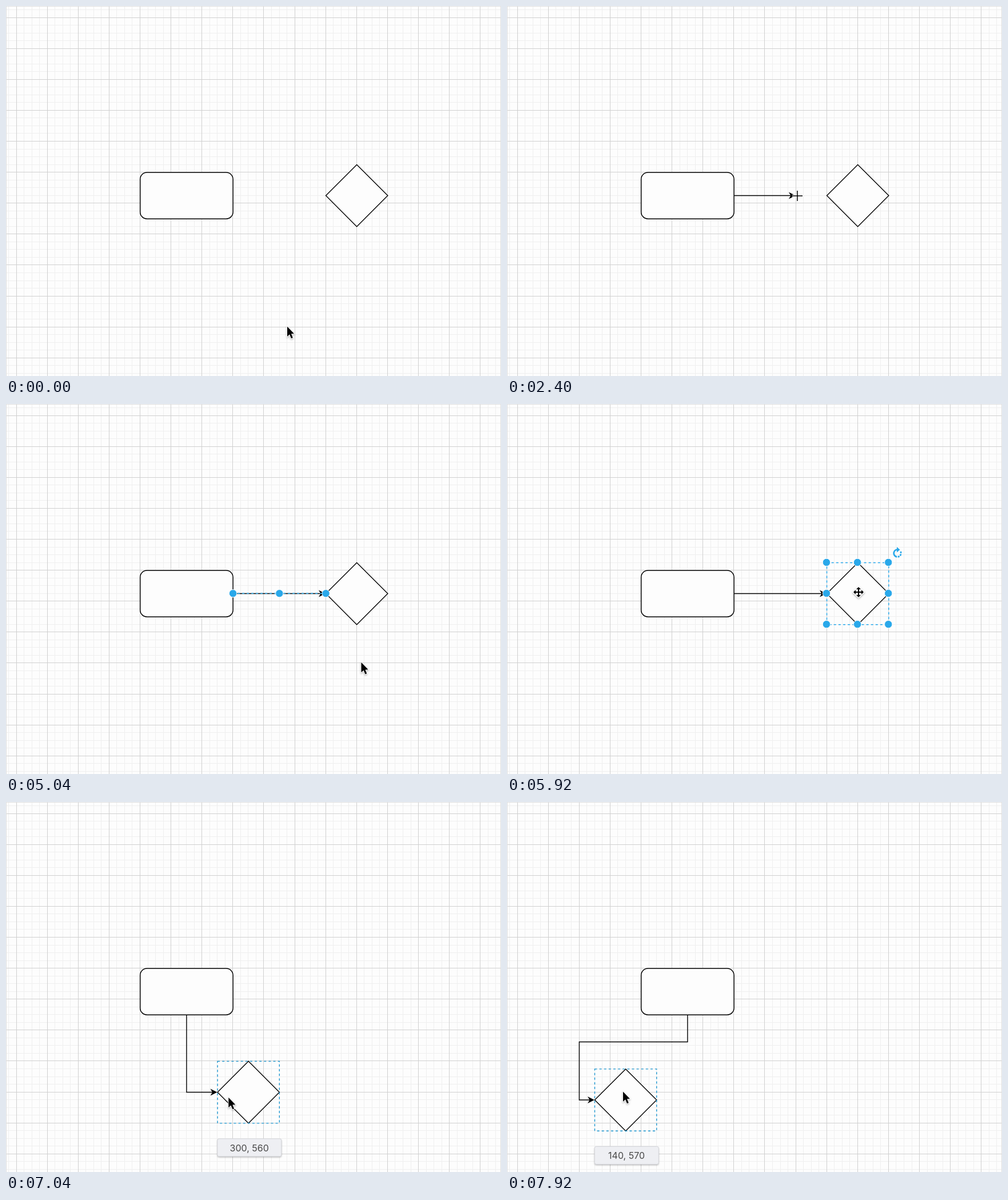
An HTML page with a canvas that plays this animation: 866 by 647 pixels, repeating every 8000 ms.

```html
<!DOCTYPE html>
<html>
<head>
<meta charset="utf-8">
<style>
  html, body { margin: 0; width: 866px; height: 647px; overflow: hidden; background: #fdfdfd; }
  canvas { display: block; }
</style>
</head>
<body>
<canvas id="stage" width="866" height="647"></canvas>
<script>
const W = 866, H = 647, LOOP = 8000, STEP = 80, LAG = 60;
const UNIT = 1.3535, OX = -36, OY = -304.6;
const BLUE = '#29a8ea', GREEN = '#86fc7c', PAPER = '#fdfdfd';
const ctx = document.getElementById('stage').getContext('2d');

// Diagram units
const BOX = { x: 200, y: 440, w: 120, h: 60 };
const HOME = { x: 440, y: 430 }, SIZE = 80, ROW = 470;

// When each part of the gesture begins
const AIM = 1440, CONNECT = 1680, DOCK = 3120, RELEASE = 3920, LEAVE = 4560,
      DESELECT = 5120, SELECT = 5840, DRAG = 6160;

// Pointer stops: time, x, y
const stops = [
  [0, 492, 560], [80, 422, 464], [240, 422, 464], [880, 318, 332], [1520, 397, 332],
  [2160, 462, 332], [2400, 508, 332], [2960, 574, 332], [3440, 555, 332], [4480, 555, 332],
  [4960, 650, 450], [5440, 479, 458], [5840, 615, 329], [6080, 615, 329], [6240, 627, 390],
  [6640, 586, 447], [7120, 350, 530], [7440, 292, 534], [7760, 222, 531], [7920, 203, 506]
];

const px = x => OX + x * UNIT;
const py = y => OY + y * UNIT;
const snap = v => Math.round(v / 10) * 10;

function pointerAt(t) {
  const i = stops.findIndex(s => s[0] > t);
  if (i < 0) return stops[stops.length - 1].slice(1);
  const [t0, x0, y0] = stops[i - 1], [t1, x1, y1] = stops[i];
  const k = (t - t0) / (t1 - t0);
  return [x0 + (x1 - x0) * k, y0 + (y1 - y0) * k];
}

// The dragged shape trails the pointer and snaps to the grid.
function diamondAt(t) {
  if (t < DRAG) return HOME;
  const [x, y] = pointerAt(t - LAG);
  return { x: snap((x - OX) / UNIT - SIZE / 2), y: snap((y - OY) / UNIT - SIZE / 2) };
}

function trace(points, closed) {
  ctx.beginPath();
  points.forEach(([x, y]) => ctx.lineTo(x, y));
  if (closed) ctx.closePath();
}

function circle(x, y, r) {
  ctx.beginPath();
  ctx.arc(x, y, r, 0, 7);
}

function stroke(color, width, dash = []) {
  ctx.strokeStyle = color;
  ctx.lineWidth = width;
  ctx.setLineDash(dash);
  ctx.stroke();
  ctx.setLineDash([]);
}

function fill(color) {
  ctx.fillStyle = color;
  ctx.fill();
}

function scoped(props, draw) {
  ctx.save();
  Object.assign(ctx, props);
  draw();
  ctx.restore();
}

const withShadow = draw => scoped({ shadowColor: 'rgba(0,0,0,.3)', shadowBlur: 3, shadowOffsetY: 1.5 }, draw);
const tint = draw => scoped({ globalCompositeOperation: 'multiply' }, draw);

function drawGrid() {
  ctx.fillStyle = PAPER;
  ctx.fillRect(0, 0, W, H);
  for (const major of [false, true]) {
    ctx.fillStyle = major ? '#d0d0d0' : '#efefef';
    for (let i = -1; i < 64; i++) {
      if ((i % 4 === 0) !== major) continue;
      ctx.fillRect(Math.floor(18 + i * 13.53), 0, 1, H);
      ctx.fillRect(0, Math.floor(20 + i * 13.53), W, 1);
    }
  }
  ctx.strokeStyle = '#e0e0e0';
  ctx.lineWidth = 1;
  ctx.strokeRect(.5, .5, W - 1, H + 9);
}

function drawBox() {
  ctx.beginPath();
  ctx.roundRect(px(BOX.x), py(BOX.y), BOX.w * UNIT, BOX.h * UNIT, 12);
  fill(PAPER);
  stroke('#000', 1.5);
}

function corners({ x, y }) {
  const h = SIZE / 2;
  return [[h, 0], [SIZE, h], [h, SIZE], [0, h]].map(([a, b]) => [px(x + a), py(y + b)]);
}

function drawDiamond(pos) {
  trace(corners(pos), true);
  fill(PAPER);
  stroke('#000', 1.4);
}

function drawEdge(points) {
  const p = points.map(([x, y]) => [px(x), py(y)]);
  const [x, y] = p.pop();
  const headed = x - p[p.length - 1][0] > 13;
  trace([...p, [headed ? x - 8 : x, y]]);
  stroke('#000', 1.4);
  if (!headed) return;
  trace([[x - .5, y], [x - 12.5, y - 6], [x - 9, y], [x - 12.5, y + 6]], true);
  fill('#000');
}

// Right-angled path from the box to the diamond's left corner
function route({ x, y }) {
  const right = BOX.x + BOX.w, bottom = BOX.y + BOX.h, center = BOX.x + BOX.w / 2;
  const endY = y + SIZE / 2, end = [x, endY];
  if (x >= right + 40) {
    const mid = (right + x) / 2;
    return [[right, ROW], [mid, ROW], [mid, endY], end];
  }
  if (x > center) return [[center, bottom], [center, endY], end];
  const mid = (bottom + y) / 2, left = Math.min(BOX.x, x) - 20;
  return [[center, bottom], [center, mid], [left, mid], [left, endY], end];
}

function drawPorts(points) {
  ctx.beginPath();
  for (const [x, y] of points) {
    for (const d of [-3, 3]) {
      ctx.moveTo(x - 3, y - d);
      ctx.lineTo(x + 3, y + d);
    }
  }
  stroke('#29a5d6', 1.3);
}

function boxPorts() {
  return [.25, .5, .75].flatMap(k => [0, 1].flatMap(side => [
    [px(BOX.x + BOX.w * k), py(BOX.y + BOX.h * side)],
    [px(BOX.x + BOX.w * side), py(BOX.y + BOX.h * k)]
  ]));
}

function diamondPorts() {
  return corners(HOME).flatMap((p, i, all) => {
    const q = all[(i + 1) % 4];
    return [p, [(p[0] + q[0]) / 2, (p[1] + q[1]) / 2]];
  });
}

function drawHoverArrows({ x, y, w = SIZE, h = SIZE }) {
  for (let i = 0; i < 4; i++) {
    scoped({ globalAlpha: .3 }, () => {
      ctx.translate(px(x + w / 2), py(y + h / 2));
      ctx.rotate(i * Math.PI / 2);
      ctx.translate((i % 2 ? h : w) / 2 * UNIT, 0);
      trace([[14, -6], [27, -6], [27, -13], [42, 0], [27, 13], [27, 6], [14, 6]], true);
      fill(BLUE);
    });
  }
}

function drawHandle(x, y) {
  circle(x, y, 6.7);
  fill(BLUE);
  stroke('#fff', 1);
}

function drawRotateIcon(x, y) {
  ctx.beginPath();
  ctx.arc(x, y, 6.3, 1.7, 4.7);
  stroke(BLUE, 2.8);
  ctx.beginPath();
  ctx.arc(x, y, 6.3, -.5, 1.7);
  stroke(BLUE, 2.8, [3, 1.5]);
  trace([[x - 1, y - 11], [x + 4.5, y - 6.3], [x - 1, y - 1.5]], true);
  fill(BLUE);
}

function frame({ x, y }, color, width) {
  ctx.beginPath();
  ctx.rect(px(x), py(y), SIZE * UNIT, SIZE * UNIT);
  stroke(color, width, [3 * UNIT, 3 * UNIT]);
}

function drawSelection() {
  frame(HOME, BLUE, 1.5);
  const half = SIZE / 2 * UNIT;
  for (let i = 0; i < 9; i++) {
    if (i !== 4) drawHandle(px(HOME.x) - .6 + i % 3 * half, py(HOME.y) - .5 + Math.floor(i / 3) * half);
  }
  drawRotateIcon(683, 261);
}

function drawEdgeSelection() {
  const y = py(ROW) - .3, from = BOX.x + BOX.w;
  trace([[px(from), y], [px(HOME.x), y]]);
  stroke(BLUE, 1.5, [4, 4]);
  for (const x of [from, (from + HOME.x) / 2, HOME.x]) drawHandle(px(x), y);
}

function drawDrag(pos) {
  const left = px(pos.x), top = py(pos.y);
  frame(pos, '#1b95cf', 1.4);
  withShadow(() => {
    ctx.beginPath();
    ctx.roundRect(left - .2, top + 135.5, 112, 31, 3);
    fill('#eeeff3');
  });
  stroke('#d4d5da', 1);
  ctx.fillStyle = '#484848';
  ctx.font = '16px Inter, sans-serif';
  ctx.textAlign = 'center';
  ctx.fillText(pos.x + ', ' + pos.y, left + 55.6, top + 157.3);
}

const pointers = {
  arrow() {
    trace([[0, .5], [0, 18], [4.1, 14.3], [7, 21.2], [9.8, 20], [7, 13.3], [12, 13]], true);
    withShadow(() => stroke('#fff', 1.8));
    fill('#000');
  },
  cross() {
    ctx.beginPath();
    ctx.moveTo(-9, 0); ctx.lineTo(9, 0);
    ctx.moveTo(0, -9); ctx.lineTo(0, 9);
    stroke('#fff', 4);
    stroke('#000', 1.5);
  },
  move() {
    const arm = [[-1.1, -1.1], [-1.1, -5], [-4, -5], [0, -9], [4, -5], [1.1, -5]];
    const turn = ([x, y]) => [-y, x];
    const points = [];
    for (let i = 0, part = arm; i < 4; i++, part = part.map(turn)) points.push(...part);
    trace(points, true);
    withShadow(() => stroke('#fff', 3));
    fill('#000');
  }
};

function render(t) {
  const within = (a, b) => t >= a && t < b;
  const [mx, my] = pointerAt(t);
  const pos = diamondAt(t);
  const ux = (mx - OX) / UNIT, uy = (my - OY) / UNIT;
  const overBox = Math.abs(ux - BOX.x - BOX.w / 2) <= BOX.w / 2 + 2 && Math.abs(uy - ROW) <= BOX.h / 2;
  const overDiamond = Math.abs(ux - HOME.x - SIZE / 2) + Math.abs(uy - ROW) <= SIZE / 2 + 4;
  const connecting = within(CONNECT, RELEASE);

  drawGrid();
  drawBox();
  drawDiamond(pos);

  if (connecting) drawEdge([[BOX.x + BOX.w, ROW], [Math.min(HOME.x, snap(ux)), ROW]]);
  else if (t >= RELEASE) drawEdge(route(pos));

  if (t < CONNECT && overBox) {
    drawPorts(boxPorts());
    drawHoverArrows(BOX);
  }
  if (connecting && overDiamond) {
    drawPorts(diamondPorts());
    tint(() => {
      if (t >= DOCK) {
        circle(px(HOME.x) + .4, py(ROW), 11.8);
        fill(GREEN);
      } else {
        trace(corners(HOME), true);
        stroke(GREEN, 4);
      }
    });
  }
  if (within(RELEASE, DESELECT)) drawEdgeSelection();
  if (within(DESELECT, SELECT) && overDiamond) {
    drawPorts(diamondPorts());
    drawHoverArrows(HOME);
  }
  if (within(SELECT, DRAG)) drawSelection();
  if (t >= DRAG) drawDrag(pos);

  const hovering = t < AIM ? overBox : within(DESELECT, DRAG) && overDiamond;
  const kind = within(AIM, LEAVE) ? 'cross' : hovering ? 'move' : 'arrow';
  scoped({}, () => {
    ctx.translate(mx, my);
    pointers[kind]();
  });
}

const start = performance.now();
function tick(now) {
  const t = Math.max(0, now - start) % LOOP;
  render(Math.floor(t / STEP) * STEP);
  requestAnimationFrame(tick);
}
render(0);
requestAnimationFrame(tick);
</script>
</body>
</html>
```
